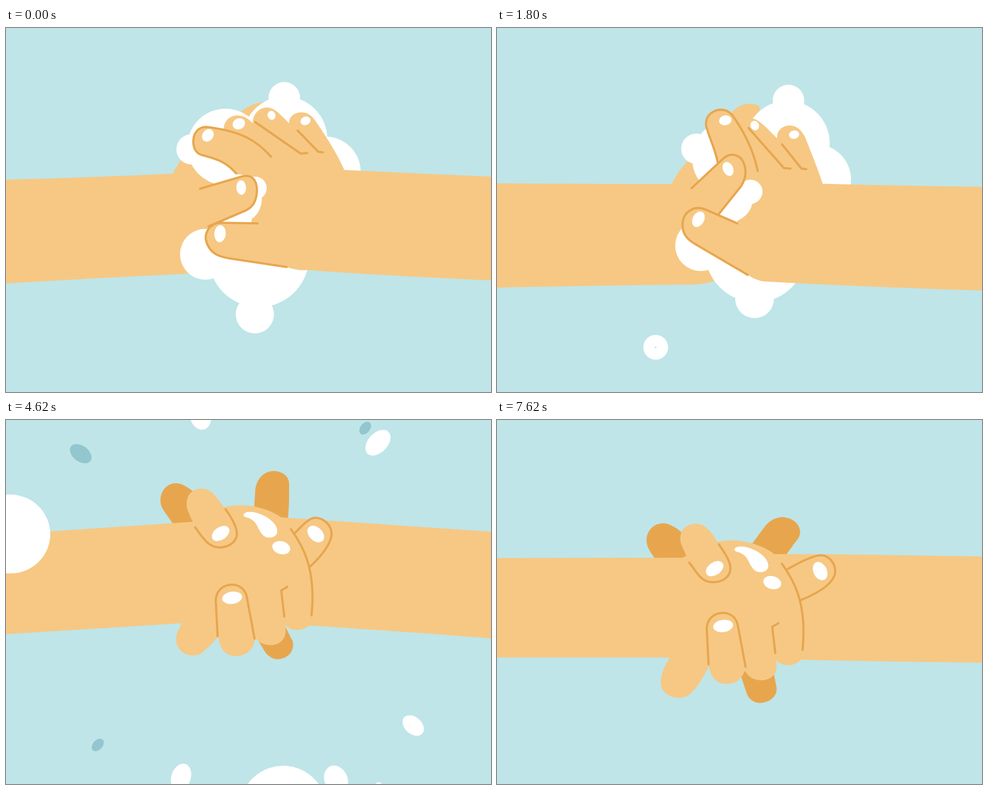
An HTML page with a canvas for the animation above (7.65 s loop, 800x600 px).

```html
<!DOCTYPE html>
<html lang="en">
<head>
<meta charset="utf-8">
<title>Hand washing</title>
<style>
html, body { margin: 0; width: 100%; height: 100%; overflow: hidden; background: #bfe5e8; }
canvas { display: block; width: 100vw; height: 100vh; }
</style>
</head>
<body>
<canvas id="stage" width="800" height="600"></canvas>
<script>
const ctx = document.getElementById('stage').getContext('2d');
const LOOP = 7650, BEAT = 510, BURST = 4320;
const BG = '#bfe5e8', SHADE = '#93c6cf', SKIN = '#f6c884', DEEP = '#e7a64e', WHITE = '#fff';

// Each part: kind, then poses. A pose is a path, or a [dx, dy] shift of the first pose.
// Kinds: s skin, d dark skin, w white, o skin with outline up to "|", l line, e white ellipse.
const washing = [
  ['s', 'M-20 251 L0 250 Q150 246 275 240 C285 222 290 215 300 200 L385 140 C400 127 415 122 430 122 L430 300 L345 395 Q325 404 300 405 Q150 412 0 421 L-20 422Z',
        'M-20 256 L0 256 Q150 257 288 257.5 C297 240 306 228 320 214 L388 138 C400 126 415 120 433 129 L433 300 L370 412 Q350 422 330 423 Q150 425 0 428 L-20 428Z'],
  ['e', '362 196 63 63', '385 215 63 63'],
  ['e', '306 200 25 25', '329 199 25 25'],
  ['e', '460 183 70 70', '479 190 70 70'],
  ['e', '459 115 26 26', '481 119.5 26 26'],
  ['e', '527 237 58 58', '526 250 58 58'],
  ['e', '329 373 42 42', '336 358.5 42 42'],
  ['e', '417 377 83 83', '427 368 84 84'],
  ['e', '410.5 472 31.5 31.5', '425 446 32 32'],
  ['s', 'M359 168 C359 152 370 144 383 144 C395 145 402 152 407 157 L430 190 L380 190Z',
        'M385 165 C385 150 392 146 400 147 C405 148 410 151 414 158 L430 200 L390 190Z'],
  ['s', 'M385 250 L365 190 L407 157 C407 140 420 131 430 131 C442 131 450 140 467 157 C466 147 475 139 488 139 C500 139 508 148 515 160 C530 182 545 205 558 234 Q660 239 800 245 L820 246 L820 417 L800 416 Q600 407 497 399 C485 400 475 398 463 394 L380 382 L405 322 L405 300Z',
        'M385 225 L400 190 L405 152 C412 149 418 147 424 150 C436 154 445 166 462 182 C461 170 470 161 483 161 C495 161 503 170 508 180 C518 205 530 235 537 257 Q660 260 800 262 L820 262 L820 434 L800 433 Q600 427 440 418 C430 417 420 412 413 407 L360 375 L396 322 L400 300Z'],
  ['e', '384 158 10.5 9 -25', '384 152 10 9 -20'],
  ['e', '438 144 6.5 7.5 -15', '425 161 7 8 -25'],
  ['e', '494 153 8.5 7 -20', '490 176 8.5 7 -10'],
  ['l', 'M411 155 L486 207 L497 206', 'M415 165 L473 231 L484 232'],
  ['l', 'M481 169 L515 204 L523 205', 'M470 192 L502 232 L510 233'],
  ['o', 'M437 212 C415 187 390 170 330 163 C316 163 308 175 309 190 C310 200 315 207 322 209 C345 215 365 220 383 244|',
        'M430 236 C425 210 412 178 392 148 C383 133 368 132 358 137 C347 143 343 153 346 164 C352 185 360 200 364 222|'],
  ['e', '333 177 9 11 35', '377 152 10.5 8 -12'],
  ['e', '411 264 19 19', '418 270 20 20'],
  ['e', '381 282 41 41', '383 281 39 39'],
  ['w', 'M355 320 L405 320 L405 295 L385 300Z', 'M370 312 L392 320 L405 310 L385 300Z'],
  ['o', 'M320 265 L388 245 C405 240 414 250 414 268 C413 285 408 295 395 301 L334 327 | L300 310',
        'M321 264 L373 215 C385 204 400 208 406 220 C413 235 410 248 403 260 L365 308 | L305 300'],
  ['e', '388 263 8 12 -3', '381 232 8.5 12 -25'],
  ['o', 'M415 322 L353 321 C333 323 326 341 331 354 C338 373 352 377 370 380 L463 394 | L470 360',
        'M396 322 L346 300 C325 290 308 303 306 320 C304 340 315 350 330 358 L413 407 | L440 370'],
  ['e', '353 339 9.5 14 4', '332 315 9.5 13.5 28']
];

const clasped = [
  ['d', 'M262 230 C250 215 245 205 247 193 C251 173 272 164 290 175 C300 180 308 188 318 198 L318 230Z',
        'M262 230 C252 215 249 208 250 198 C254 176 272 168 288 176 C298 180 305 186 314 193 L318 230Z',
        'M278 175 C262 150 253 145 255 128 C259 106 278 100 292 107 C302 112 310 118 320 128 L325 175Z'],
  ['d', 'M420 205 L440 178 C448 166 460 160 472 160 C490 162 500 173 500 185 C500 192 496 197 490 204 L475 225 L430 225Z',
        'M404 203 L407 178 C410 158 422 148 437 147 C453 148 463 157 463 169 C463 180 463 195 462 203 L457 225 L415 225Z',
        'M409 150 L411 118 C412 98 425 84 442 84 C458 85 467 94 467 105 C467 125 467 140 466 150 L465 165 L415 165Z'],
  ['d', 'M400 415 L411 448 C415 463 428 468 438 466 C453 464 463 453 461 440 L455 410Z',
        'M385 405 L388 440 C389 458 400 465 413 465 C428 465 438 455 438 440 L441 405Z',
        'M405 345 L423 375 C430 390 442 396 452 394 C468 391 476 379 473 365 L458 335Z'],
  ['s', 'M290 385 C278 400 269 420 270 435 C272 455 300 465 317 453 C330 442 340 425 350 405 L345 385Z',
        'M280 385 C272 400 264 415 266 428 C270 447 295 455 309 444 C320 435 330 425 340 410 L345 385Z',
        'M292 330 C286 345 279 352 281 367 C286 388 310 393 323 384 C335 374 342 366 350 357 L345 330Z'],
  ['s', 'M-20 227.5 L0 227.5 L305 227 L420 227 L420 391.5 L275 391.5 L0 391.5 L-20 391.5Z', [0, 0],
        'M-20 190 L0 188.5 L305 168 L420 165 L420 335 L290 335 L0 353 L-20 354Z'],
  ['s', 'M400 222 L455 221 C600 221 720 224 800 225 L820 225 L820 400 L800 400 C700 399 580 397 490 395 L400 395Z', [0, 0],
        'M400 160 L445 160 C600 170 720 179 800 184 L820 185 L820 361 L800 360 C700 352 580 344 490 338 L400 338Z'],
  ['o', 'M479 246 C500 234 520 224 533 223 C548 222 558 237 558 250 C557 268 535 283 501 297|',
        'M472 244 C495 228 510 215 524 215 C540 216 549 230 548 244 C546 262 525 282 495 296|',
        'M477 186 C490 172 500 162 510 161 C526 162 538 175 537 190 C535 205 520 225 501 242|'],
  ['e', '533 249 11 16 -25', '523 241 11 15.5 -32', '511 188 11 16 -45'],
  ['s', 'M300 230 L330 215 C365 190 420 195 455 219 L470 237 C488 262 512 300 504 379 L500 396 C490 407 470 407 461 396 L461 405 C462 420 450 429 437 429 C422 429 412 422 408 410 L345 395 L300 385Z', [-7.5, -2], [0, -58]],
  ['l', 'M470 237 C488 262 512 300 504 379', [-7.5, -2.5], [0, -57]],
  ['l', 'M464 335 L454 341 L459 384', [-7.5, -1], [0, -60]],
  ['w', 'M393 211 C400 205 425 210 440 225 C450 235 450 247 440 250 C425 254 420 243 414 231 C409 221 400 218 395 217 C391 215 391 213 393 211Z', [-7.5, -2.5], [0, -57]],
  ['e', '454 268 15 10.5 15', '447 265 15 10.5 15', '454 210.5 15 10.5 15'],
  ['s', 'M349 400 C351 425 362 435 379 435 C396 435 408 424 410 405Z', [-8, 8], [1, -46]],
  ['o', 'M349 403 L346 345 C346 328 358 318 372 318 C386 318 394 326 397 337 L410 407|', [-8.5, 8], [0, -46.5]],
  ['e', '373 339.5 16.5 10 -8', '365 347 16.5 10 -8', '373 293 16.5 10 -8'],
  ['o', 'M317 235 C328 248 335 266 352 267 C372 269 386 258 385 243 C384 230 374 217 366 205 | L358 192 C350 181 342 171 328 171 C310 171 298 185 304 205Z',
        'M316 225 C325 240 335 262 352 263 C372 264 384 252 383 240 C382 225 374 212 368 201 | L358 183 C352 173 345 163 331 163 C313 163 300 180 308 205Z',
        'M312 177 C322 190 332 209 350 210 C368 211 381 200 381 187 C380 173 370 158 362 147 | L350 131 C344 122 335 113 322 113 C305 113 293 128 300 150Z'],
  ['e', '359 245 16 10.5 -35', '357 240 16 10.5 -25', '354 187 16 10.5 -35']
];

const foam = [[365, 215, 172], [410, 385, 199], [215, 317, 87], [565, 241, 110], [595, 320, 86],
  [584, 422, 46], [508, 153, 62], [231, 108, 15], [200, 211, 25], [272, 410, 62]];
const shadows = [[422, 86, 52], [530, 424, 119]];
const creases = ['M255 192 C285 180 320 188 335 213', 'M313 193 C318 165 365 134 408 144',
  'M509 167 C522 190 528 220 525 246', 'M491 266 C515 243 548 240 584 257',
  'M403 318 C412 340 403 372 377 385', 'M384 385 C395 430 385 470 348 481',
  'M537 422 C536 403 548 388 562 383'];

// start time, from x y, to x y, full radius, shaded
const bubbles = [
  [180, 490, 447, 540, 545, 21], [356, 328, 170, 210, 92, 18], [410, 505, 401, 600, 480, 18, 1],
  [700, 460, 110, 480, 42, 20], [860, 330, 400, 230, 500, 19], [1000, 530, 400, 590, 535, 20],
  [1181, 335, 410, 250, 545, 21], [1820, 455, 120, 400, 36, 20], [1880, 320, 190, 215, 110, 18],
  [1900, 500, 410, 600, 555, 20], [2050, 350, 410, 220, 520, 17, 1], [2250, 370, 430, 290, 580, 20],
  [2100, 520, 180, 640, 80, 19], [2692, 572, 540, 613, 595, 12], [2950, 440, 70, 480, 27, 18],
  [3080, 200, 160, 110, 80, 17], [3400, 620, 420, 710, 520, 20, 1], [3550, 270, 500, 160, 560, 20]
];

// x, y, half width, half length, shaded: where each drop is 300 ms after the burst
const drops = [[8, 188, 65, 66], [457, 641, 72, 72], [613, 38, 16, 25], [321, -5, 17, 22],
  [671, 503, 14, 20], [289, 588, 16, 23], [544, 592, 19, 24], [615, 603, 6, 7],
  [124, 56, 13, 20, 1], [592, 14, 8, 12, 1], [152, 535, 8, 12, 1]];

const lifts = [[BURST, 0], [4530, 1.1], [4620, 1], [4950, -.15], [5200, .05], [5440, 0]];

const NUM = /-?[\d.]+/g;
const nums = s => s.match(NUM).map(Number);
const clamp = v => Math.min(1, Math.max(0, v));
const ramp = (t, a, b) => clamp((t - a) / (b - a));
const wave = x => (1 - Math.cos(x)) / 2;
const backOut = u => 1 + 2.2 * (u - 1) ** 3 + 1.2 * (u - 1) ** 2;
const pose = (base, p) => Array.isArray(p) ? nums(base).map((v, i) => v + p[i % 2]) : nums(p);

function blend(a, b, s, c, k) {
  const A = nums(a), B = pose(a, b), C = c && pose(a, c);
  let i = 0;
  return a.replace(NUM, () => {
    let v = A[i] + (B[i] - A[i]) * s;
    if (C) v += (C[i] - v) * k;
    i++;
    return v.toFixed(2);
  });
}

function ellipse(x, y, rx, ry = rx, turn = 0, color = WHITE) {
  ctx.fillStyle = color;
  ctx.beginPath();
  ctx.ellipse(x, y, Math.max(0, rx), Math.max(0, ry), turn, 0, 7);
  ctx.fill();
}

function line(d, color, width) {
  ctx.strokeStyle = color;
  ctx.lineWidth = width;
  ctx.stroke(new Path2D(d));
}

function drawHands(parts, s, k) {
  for (const [kind, a, b, c] of parts) {
    const d = blend(a, b, s, c, k);
    if (kind === 'e') {
      const [x, y, rx, ry, deg = 0] = nums(d);
      ellipse(x, y, rx, ry, deg * Math.PI / 180);
      continue;
    }
    if (kind !== 'l') {
      ctx.fillStyle = { d: DEEP, w: WHITE }[kind] || SKIN;
      ctx.fill(new Path2D(d.replace('|', ' ')));
    }
    if (kind === 'l' || kind === 'o') line(d.split('|')[0], DEEP, 3.6);
  }
}

function drawBubbles(t) {
  for (const [start, x0, y0, x1, y1, size, shaded] of bubbles) {
    const u = (t - start) / 720;
    if (u <= 0 || u >= 1) continue;
    const x = x0 + (x1 - x0) * u, y = y0 + (y1 - y0) * u;
    const r = size * Math.sin(u * Math.PI / 2);
    ctx.beginPath();
    ctx.arc(x, y, r, 0, 7);
    if (u > .85) {
      ctx.moveTo(x, y);
      ctx.arc(x, y, r * ramp(u, .85, 1), 0, 7);
    }
    ctx.fillStyle = shaded ? SHADE : WHITE;
    ctx.fill('evenodd');
  }
}

function drawFoam(list, t, color) {
  const u = ramp(t, BURST, 4620);
  if (u === 1) return;
  list.forEach(([x, y, r], i) => {
    const g = ramp(t, 2180 + i * 25, 2580 + i * 25);
    if (!g) return;
    const grow = backOut(g) * (1 - .08 * ramp(t, 4200, BURST));
    const sway = 2 * Math.sin((t - 2850) / 130) * Math.cos(i * 2) * ramp(t, 2700, 2900);
    const dx = x - 402, dy = y - 300, dist = Math.hypot(dx, dy);
    const push = (.4 + .6 * grow) + 850 * u ** 1.3 / dist;
    ellipse(402 + dx * push + sway, 300 + dy * push + sway, r * grow * (1 - .55 * u), undefined, 0, color);
  });
}

function drawCreases(t) {
  if (t > BURST) return;
  creases.forEach((d, i) => {
    const shown = ramp(t, 2560 + i * 15, 2740 + i * 15);
    if (!shown) return;
    ctx.setLineDash([shown * 180, 400]);
    line(d, BG, 4.5);
  });
  ctx.setLineDash([]);
}

function drawDrops(t) {
  if (t < BURST || t > 5200) return;
  const g = .25 + .75 * (t - BURST) / 300;
  for (const [x, y, w, h, shaded] of drops) {
    const dx = x - 400, dy = y - 260;
    ellipse(400 + dx * g, 260 + dy * g, w, h, Math.atan2(dy, dx) + Math.PI / 2, shaded ? SHADE : WHITE);
  }
}

function liftAt(t) {
  for (let i = 1; i < lifts.length; i++) {
    const [t0, a] = lifts[i - 1], [t1, b] = lifts[i];
    if (t < t1) return a + (b - a) * wave(Math.PI * ramp(t, t0, t1));
  }
  return 0;
}

function draw(t) {
  ctx.fillStyle = BG;
  ctx.fillRect(0, 0, 800, 600);
  drawBubbles(t);
  drawFoam(shadows, t, SHADE);
  if (t < BURST) {
    ctx.save();
    ctx.translate(0, -26 * wave(Math.PI * ramp(t, 4200, BURST)));
    drawHands(washing, wave(2 * Math.PI * t / BEAT), 0);
    ctx.restore();
  } else {
    drawHands(clasped, wave(2 * Math.PI * (t - 7620) / BEAT), liftAt(t));
  }
  drawFoam(foam, t, WHITE);
  drawCreases(t);
  drawDrops(t);
}

ctx.lineCap = ctx.lineJoin = 'round';
const begin = performance.now();
function tick() {
  draw((performance.now() - begin) % LOOP);
  requestAnimationFrame(tick);
}
tick();
</script>
</body>
</html>
```
